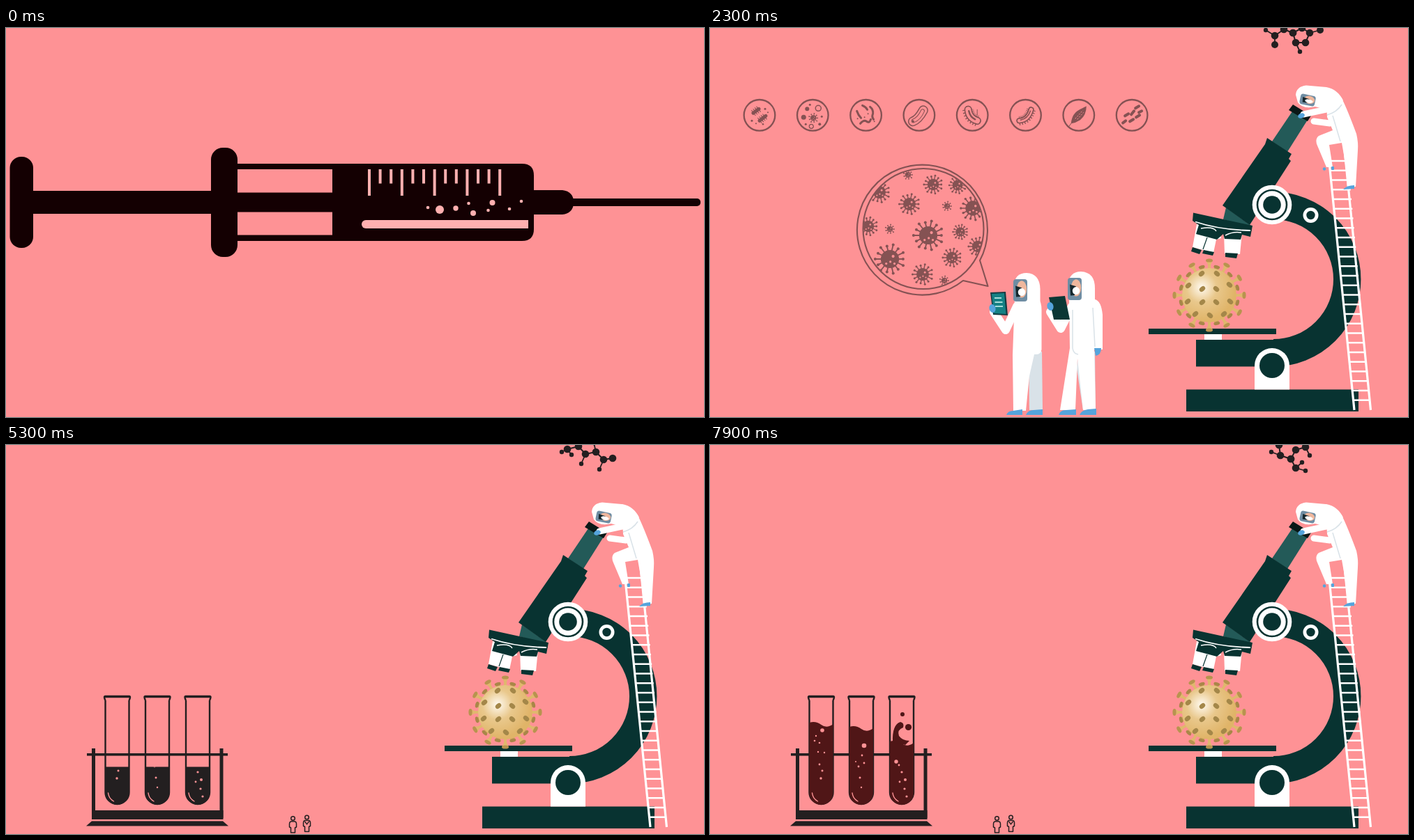
An HTML page that plays this animation: 1001x559 px, repeating every 8 s.

```html
<!DOCTYPE html>
<html lang="en">
<head>
<meta charset="utf-8">
<title>Lab</title>
<style>
html, body { margin: 0; width: 100%; height: 100%; overflow: hidden; background: #fe9295; }
svg { display: block; width: 1001px; height: 559px; }
</style>
</head>
<body>
<svg id="stage" viewBox="0 0 1001 559"></svg>
<script>
const PINK = '#fe9295', INK = '#231f20', DARK = '#083331', TEAL = '#235a58', BLUE = '#55a4dc', SHADE = '#d9e2e8';
const LOOP = 8000;

const path = (d, fill = 'none', extra = '') => `<path d="${d}" fill="${fill}" ${extra}/>`;
const line = (d, color, w, extra = '') => path(d, 'none', `stroke="${color}" stroke-width="${w}" ${extra}`);
const rect = (x, y, w, h, fill, r = 0) => `<rect x="${x}" y="${y}" width="${w}" height="${h}" rx="${r}" fill="${fill}"/>`;
const disc = (x, y, r, fill) => `<circle cx="${x}" cy="${y}" r="${r}" fill="${fill}"/>`;
const ring = (x, y, r, w, color = INK) => `<circle cx="${x}" cy="${y}" r="${r}" fill="none" stroke="${color}" stroke-width="${w}"/>`;
const oval = (x, y, rx, ry, fill, turn = 0) =>
  `<ellipse cx="${x}" cy="${y}" rx="${rx}" ry="${ry}" fill="${fill}" transform="rotate(${turn} ${x} ${y})"/>`;
const group = (id, body, extra = '') => `<g id="${id}" ${extra}>${body}</g>`;
const range = (n, f) => Array.from({ length: n }, (_, i) => f(i)).join('');
const points = s => s.split(' ').map(p => p.split(',').map(Number));
const dots = (s, fill) => points(s).map(([x, y, r]) => disc(x, y, r, fill)).join('');
const ROUND = 'stroke-linecap="round" stroke-linejoin="round"';

function syringe() {
  const c = '#140002', pale = '#feb0b0';
  return rect(5.5, 185, 33.5, 131, c, 16) + rect(30, 234, 300, 33, c) +
    path('M325 195H740Q757 195 757 212V289Q757 306 740 306H325Z', c) +
    rect(329, 203, 139, 33.5, PINK) + rect(329, 264.5, 139, 33, PINK) +
    rect(294, 172, 38, 157, c, 17) +
    range(13, i => rect(519 + 15.6 * i, 203, 4, i % 3 ? 20.5 : 38, pale)) +
    path('M749 276H516a6 6 0 0 0 0 12H749Z', pale) +
    dots('605,258,2.3 622,261,6 645,259,3.7 663.5,252,2.3 670,266,4 697.5,251,4 691.5,262,2.3 722,260,2.3 739,249,2.3', pale) +
    path('M755 233H798Q814 235 814 250.5Q814 266 798 268H755Z', c) +
    rect(808, 245, 188, 11, c, 5);
}

function microscope() {
  return rect(683, 519.5, 247, 31.5, DARK) +
    rect(697, 448, 115, 38.5, DARK) +
    line('M808 255.3A105.7 105.7 0 0 1 808 466.8', DARK, 39.4) +
    path('M781 519.5V485a25 25 0 0 1 50 0V519.5Z', '#fff') + disc(806, 485, 18, DARK) +
    rect(709, 439, 25, 9, '#fff') + rect(629, 432, 183, 8, DARK) +
    path('M837 117L857 132L828 178L806 163Z', TEAL) +
    path('M836 110L862 126L857 134L830 118Z', '#0a1817') +
    path('M740 258L736 275L764 283L776 284Z', TEAL) +
    path('M799 158L834 181L830 188L833 191L774 283L735 255L796 167Z', DARK) +
    path('M698 282L729 289L733 302L726 304L722 323L692 315Z', '#fff') +
    path('M737 296L763 294L760 325L738 324Z', '#fff') +
    path('M693 265.5L778 284L775 300L763 297L761 304L738 303L736 296L727 304L697 296L701 283L692 277Z', DARK) +
    line('M696 278.5Q730 290 775 291', '#fff', 1.8) +
    line('M704 288Q722 285 726 292M739 298Q750 292 762 294', '#fff', 1.5) +
    line('M713 301L707 318', DARK, 1.2) +
    path('M692 315L705 319L702 325L690 321Z', DARK) +
    path('M708 319L723 322L721 327L706 324Z', DARK) +
    path('M739 323L757 324L755 331L739 329Z', DARK) +
    disc(806, 254, 28.3, '#fff') + ring(806, 254, 21, 2.6, DARK) + disc(806, 254, 12.8, DARK) +
    disc(861.5, 269, 11, '#fff') + disc(861.5, 269, 6.2, DARK);
}

function ladder() {
  const rung = i => {
    const y = 191 + 13.75 * i, x = 886 + (y - 170) * 0.1;
    return `M${x} ${y}h${27 - i * 0.14}`;
  };
  return line('M885.5 168L924 549M909 165L947.5 549', '#fff', 3.2) + line(range(26, rung), '#fff', 2.4);
}

const visor = (x, y, w, h) => rect(x, y, w, h, '#6f8da3', 4) +
  oval(x + w * .6, y + h * .45, w * .36, h * .38, '#efb79d') +
  path(`M${x + w * .15} ${y + h * .3}l${w * .45} ${h * .08}l${-w * .1} ${h * .4}l${-w * .3} ${h * .02}Z`, '#16272d') +
  oval(x + w * .6, y + h * .58, w * .26, h * .17, '#fff');

function climber() {
  const upright = (x, y) => oval(x, y, 17, 17, '#fff') + path(`M${x - 10} ${y}h24l10 22h-22Z`, '#fff') + visor(x - 17, y - 4, 17, 17);
  return path('M884 106Q894 97 906 101Q914 117 927 152Q930 165 929 176L926 228L914 229Q912 196 906 165L888 168L893 200L884 200L871 169Q867 160 873 155L893 147L885 128Z', '#fff') +
    line('M893 115L851 124M889 137L866 134', '#fff', 9, ROUND) +
    line('M906 110Q899 121 885 125M893 126L904 163', SHADE, 1.5) +
    oval(848, 126, 5, 3.5, BLUE, -20) +
    path('M908 232Q913 226 924 226L924 231Z', BLUE) + disc(881, 202.5, 2.2, BLUE) + rect(891, 199, 4, 5, BLUE, 1) +
    group('headA', upright(881, 93)) + group('headB', upright(879, 88)) +
    group('headC', path('M840 96Q841 84 855 82.5L884 85Q900 88 908 104L886 118L868 113Q850 117 843 107Z', '#fff') +
      `<g transform="rotate(12 857 104)">${visor(846, 96, 22, 15)}</g>`);
}

function corona() {
  const cx = 716, cy = 384;
  const spike = (deg, r, stem, cap, s) => `<g transform="translate(${cx} ${cy}) rotate(${deg})">` +
    path(`M${-2 * s} ${-34}L${-2 * s} ${-r + 6}L${-5 * s} ${-r}H${5 * s}L${2 * s} ${-r + 6}V-34Z`, stem) + oval(0, -r, 5 * s, 2.6 * s, cap) + '</g>';
  return range(12, i => spike(i * 30 + 15, 42, '#c69d58', '#a98648', .9)) +
    range(12, i => spike(i * 30, 50, '#e0b76e', '#b8934f', 1)) +
    disc(cx, cy, 39, 'url(#gold)') +
    points('705,353 727,353 686,370 745,369 706,375 726,375 685,393 746,393 706,394 726,394 696,411 717,413 737,411')
      .map(([x, y], i) => oval(x, y, 4.6, 3.4, '#a48749', i % 2 ? 40 : -40)).join('');
}

function scientistOne() {
  return path('M457 465H476L477 549H458Z', SHADE) +
    path('M437 388H470Q476 393 475.5 408V462Q475 470 465 469L458 500L453 550H435L434 470Z', '#fff') +
    line('M440 400L424 434L407 408', '#fff', 12, ROUND) +
    path('M436 370Q437 352 454 352Q473 353 473.5 375V398H440Z', '#fff') +
    visor(435, 361, 20, 32) +
    path('M402 380L424 379L427 413L406 412Z', '#143c43') + path('M404 382L422 381L424.5 411L407 410Z', '#168184') +
    line('M408 388h10M408.500 394h11M409 400h11', '#a8dcd9', 2) +
    oval(405, 403, 4.5, 6, BLUE, -15) +
    path('M425 556Q427 550 435 550L448 548V556ZM453 556Q456 549 464 549L477 548V556Z', BLUE);
}

function scientistTwo() {
  return path('M530 465H552L553 549H535L526 490L522 549H514Z', SHADE) +
    path('M515 390H552Q561 392 563 412V462H551L553 549H535L527 475L524 549H502L516 460Z', '#fff') +
    line('M519 400L503 432L488 408', '#fff', 12, ROUND) +
    path('M513 370Q515 350 532 350Q552 351 552 374V396H516Z', '#fff') +
    visor(513, 359, 20, 32) +
    line('M520 405V460Q521 468 528 469M549 402L552 458', SHADE, 1.5) +
    path('M486 387L509 385L516 419L493 419Z', '#0b3735') +
    oval(488, 400, 4.500, 6, BLUE, -15) +
    path('M551 460H561Q561 470 553 471Z', BLUE) +
    path('M500 556Q502 549 511 549L525 548V556ZM530 556Q533 549 542 548L554 547V556Z', BLUE);
}

function germ(x, y, r) {
  const n = r > 7 ? 14 : 9, b = r * .82;
  const ray = i => {
    const a = i * 2 * Math.PI / n, t = r * (i % 2 ? 1.32 : 1.18);
    const px = x + t * Math.cos(a), py = y + t * Math.sin(a);
    return line(`M${x} ${y}L${px} ${py}`, INK, r * .1 + .3) + disc(px, py, r * .1 + .4, INK);
  };
  return range(n, ray) + disc(x, y, b, INK) +
    range(3, i => disc(x + b * (.5 - .45 * i), y + b * (.5 - .2 * (i % 2)), r * .1, PINK)) + disc(x + b * .35, y - b * .3, r * .13, PINK);
}

function microbes() {
  const rod = (d, w) => line(d, INK, w, 'stroke-linecap="round"');
  const fuzz = (d, w) => rod(d, w) + line(d, INK, w + 5, 'stroke-dasharray="1 2"');
  const hollow = (d, w) => fuzz(d, w) + rod(d, w) + line(d, PINK, w - 3, 'stroke-linecap="round"');
  const art = [
    fuzz('M-9 -3L-1 -9', 5) + fuzz('M0 8L9 1', 5) + dots('-11,8,1.5 -5,12,1 8,-9,1.5 12,-4,1 5,13,1.2', INK),
    germ(1, 4, 5) + ring(8, -10, 4, 1.5) + ring(-2, 16, 3, 1.3) + dots('-8,-9,3 -13,3,3.5 13,2,1.5 -4,-15,1.5 10,13,2 -10,13,1.5', INK),
    rod('M-13 -6q2 6 6 10M-5 -14q5 2 7 6M6 -12q5 4 4 10q-2 4 1 8M-8 12q5 -6 9 -3q4 3 6 -3', 3) + dots('-12,5,1 3,-2,1 12,9,1 -2,3,1', INK),
    rod('M-9 9Q-1 6 6 -7', 14) + line('M-9 9Q-1 6 6 -7', PINK, 11, 'stroke-linecap="round"') + line('M-8 8Q0 5 5 -6', INK, 6, 'stroke-linecap="round"') + line('M-8 8Q0 5 5 -6', PINK, 4, 'stroke-linecap="round"') + disc(-9, 9, 2, INK),
    hollow('M-6 -8Q-5 4 7 8', 11) + rod('M-5 -6Q-3 3 4 6', 2.5) + rod('M7 -8v8', 1),
    hollow('M-9 8Q4 7 8 -8', 8) + rod('M-7 7Q3 5 7 -6', 1.5),
    path('M-11 12Q-10 -3 3 -9Q9 -12 11 -13Q11 0 2 7Q-4 11 -11 12Z', INK) + line('M-5 5L6 -7M-2 6L7 -4', PINK, 1, 'stroke-dasharray="2 2"') + rod('M-11 12l-3 4', 1),
    rod('M-13 11l4 -3M-10 1l5 -3M-3 9l5 -3M-1 -1l4 -5M6 3l5 -3M5 -10l5 -3M10 -4l4 -2', 4)
  ];
  const icons = art.map((a, i) => `<g transform="translate(${71 + 76.3 * i} 125.3)">${ring(0, 0, 22.3, 2.3)}${a}</g>`).join('');
  const germs = points('284,211,5 320,225,10 243,236,11 355,226,9 286,253,11 340,256,5 377,259,13 227,285,10 258,289,5 313,298,16 359,293,8 258,332,16 347,330,10 384,314,10 305,354,11 336,363,5');
  return icons +
    line('M363 363A93.500 93.500 0 1 1 387 334L398.500 371Z', INK, 2.1, 'stroke-linejoin="round"') +
    ring(306, 288.5, 86.5, 2.1) +
    `<g clip-path="url(#lens)">${germs.map(g => germ(...g)).join('')}</g>`;
}

const TUBES = [159.5, 217, 275];

function rack() {
  const tube = x => line(`M${x - 17} 367V499a17 17 0 0 0 34 0V367M${x - 17} 367q-3 -6 0 -6h34q3 0 0 6`, INK, 2.4) +
    line(`M${x - 18} 362h36`, INK, 2.4, ROUND);
  const person = (x, y) => ring(x, y + 3.5, 2.8, 1.5) +
    line(`M${x - 3} ${y + 8}h6q2 1 2 3v5l-2 1v7h-6v-7l-2 -1v-5q0 -2 2 -3Z`, INK, 1.5, 'stroke-linejoin="round"');
  return rect(123, 436, 5, 100, INK) + rect(306.5, 436, 5, 100, INK) + rect(116, 443, 202, 3.6, INK) +
    rect(123, 525, 188.500, 13, INK) + path('M123 540.5H311L319 547.5H115Z', INK) +
    TUBES.map(tube).join('') +
    person(411.5, 533) + person(431.5, 531.5) + line('M428.5 541l3 4l3 -4', INK, 1.3);
}

function liquid() {
  const fill = (x, y) => path(`M${x - 17} ${y}q9 -3 17 3t17 -1V500a17 17 0 0 1 -34 0Z`);
  return `<g id="juice">` + [399, 405, 426].map((y, i) => fill(TUBES[i], y).replace('fill="none"', '')).join('') +
    path('M262 427Q261 402 273 398Q279 399 277 406Q268 409 271 418Q276 425 286 425L280 431Z').replace('fill="none"', '') +
    '<circle cx="284.500" cy="405.500" r="4.600"/><circle cx="276" cy="387" r="3"/></g>' +
    dots('161,410,2.8 152,418,1.2 150,425,1.3 157,428,1.3 155,441,1.2 164,442,1.2 157,459,1.4 161,468,1.5 159,479,1.7', PINK) +
    dots('221,432,3.3 218,446,1.4 209,455,1 213,462,1.4 221,457,1.4 215,478,1.5 217,492,1.2', PINK) +
    dots('267,455,2.7 271,460,1.4 275,470,1.6 272,484,1.4 280,481,2 279,494,1.6 282,505,1.6', PINK) +
    TUBES.map(x => line(`M${x - 13} 500q1 8 8 12`, PINK, 1.4, ROUND)).join('');
}

// Chain vertices are large atoms; twigs are "chain index,x,y".
function molecule(chain, twigs, closed = '') {
  const big = points(chain), small = points(twigs);
  return line('M' + chain + closed, INK, 2, 'stroke-linejoin="round"') +
    small.map(([i, x, y]) => line(`M${big[i]}L${x} ${y}`, INK, 1.8) + disc(x, y, 3.2, INK)).join('') +
    big.map(([x, y]) => disc(x, y, 5.3, INK)).join('');
}

const molecules = [
  molecule('812,2 826,9 840,2 853,10 867,3', '0,804,9 1,824,23 3,850,25 3,861,21 4,878,9 2,841,-8'),
  molecule('808,5 819,-4 831,0 841,11 855,11 862,-1', '0,809,19 0,818,12 5,870,3') +
    molecule('855,11 864,23', '1,859,35 1,871,31 1,871,16'),
  molecule('810,11 823,2 836,7 840,21 854,21 860,7 849,0 836,7', '0,797,3 0,810,24 3,846,34 5,875,3') + dots('810,24,5 875,3,5', INK),
  molecule('805,6 821,2 831,13 846,10 857,21 870,19', '0,797,10 0,811,14 2,825,27 4,851,35 3,843,-3'),
  molecule('826,1 837,11 851,5 855,-8', '0,812,3 2,861,15') + molecule('837,11 835,27', '1,825,33 1,845,24 1,836,36'),
  molecule('816,0 818,15 833,20 840,7 854,3 858,-8', '1,805,10 4,860,15') + molecule('833,20 840,33', '1,849,25 1,854,37')
];

const stage = document.getElementById('stage');
stage.innerHTML = `<defs>
  <radialGradient id="gold" cx=".36" cy=".36" r=".62"><stop offset="0" stop-color="#fffaf0"/><stop offset=".45" stop-color="#e9c88c"/><stop offset="1" stop-color="#e0b468"/></radialGradient>
  <clipPath id="lens"><circle cx="306" cy="288.500" r="86"/></clipPath>
  <clipPath id="wipe"><rect id="level" x="130" width="180" height="400"/></clipPath></defs>` +
  rect(0, 0, 1001, 559, PINK) + group('syringe', syringe()) +
  group('lab', microscope() + ladder() + climber()) + group('corona', corona()) +
  group('one', scientistOne()) + group('two', scientistTwo()) + group('microbes', microbes()) +
  group('rack', rack()) + group('liquid', liquid(), 'clip-path="url(#wipe)"') +
  molecules.map((m, i) => group('mol' + i, m)).join('');

const parts = {};
stage.querySelectorAll('[id]').forEach(e => parts[e.id] = e);
const show = (id, on) => parts[id].style.display = on ? '' : 'none';

function moleculeStep(t) {
  if (t < 900) return -1;
  if (t < 3300) return 1 + Math.floor((t - 900) / 200);
  if (t < 4100) return 12;
  if (t < 4600) return 13;
  return t < 4800 ? 14 : 16 + Math.floor((t - 4800) / 100);
}

function render(t) {
  const during = (a, b = LOOP) => t >= a && t < b;
  show('syringe', t < 100);
  show('lab', during(100));
  show('headA', t < 300);
  show('headB', during(300, 500));
  show('headC', during(500));
  show('corona', during(700));
  show('one', during(900, 4600));
  parts.one.setAttribute('transform', `translate(${t < 1300 ? 38 : 0} 0)`);
  show('two', during(1300, 4600));
  show('microbes', during(1500, 4600));
  parts.microbes.setAttribute('opacity', Math.min(9, Math.floor((t - 1300) / 200)) / 9);
  show('rack', during(4600));
  show('liquid', during(4800));
  const fill = Math.floor((t - 4700) / 100);
  parts.level.setAttribute('y', 519 - 9.4 * Math.max(0, Math.min(fill, 16)));
  const red = Math.max(0, Math.min(1, Math.floor((t - 7000) / 100) / 9));
  parts.juice.setAttribute('fill', `rgb(${35 + 45 * red},${31 - 9 * red},${32 - 9 * red})`);
  const step = moleculeStep(t);
  molecules.forEach((_, i) => show('mol' + i, step >= 0 && step % 6 === i));
}

const start = performance.now();
function tick() {
  render((performance.now() - start) % LOOP);
  requestAnimationFrame(tick);
}
tick();
</script>
</body>
</html>
```
